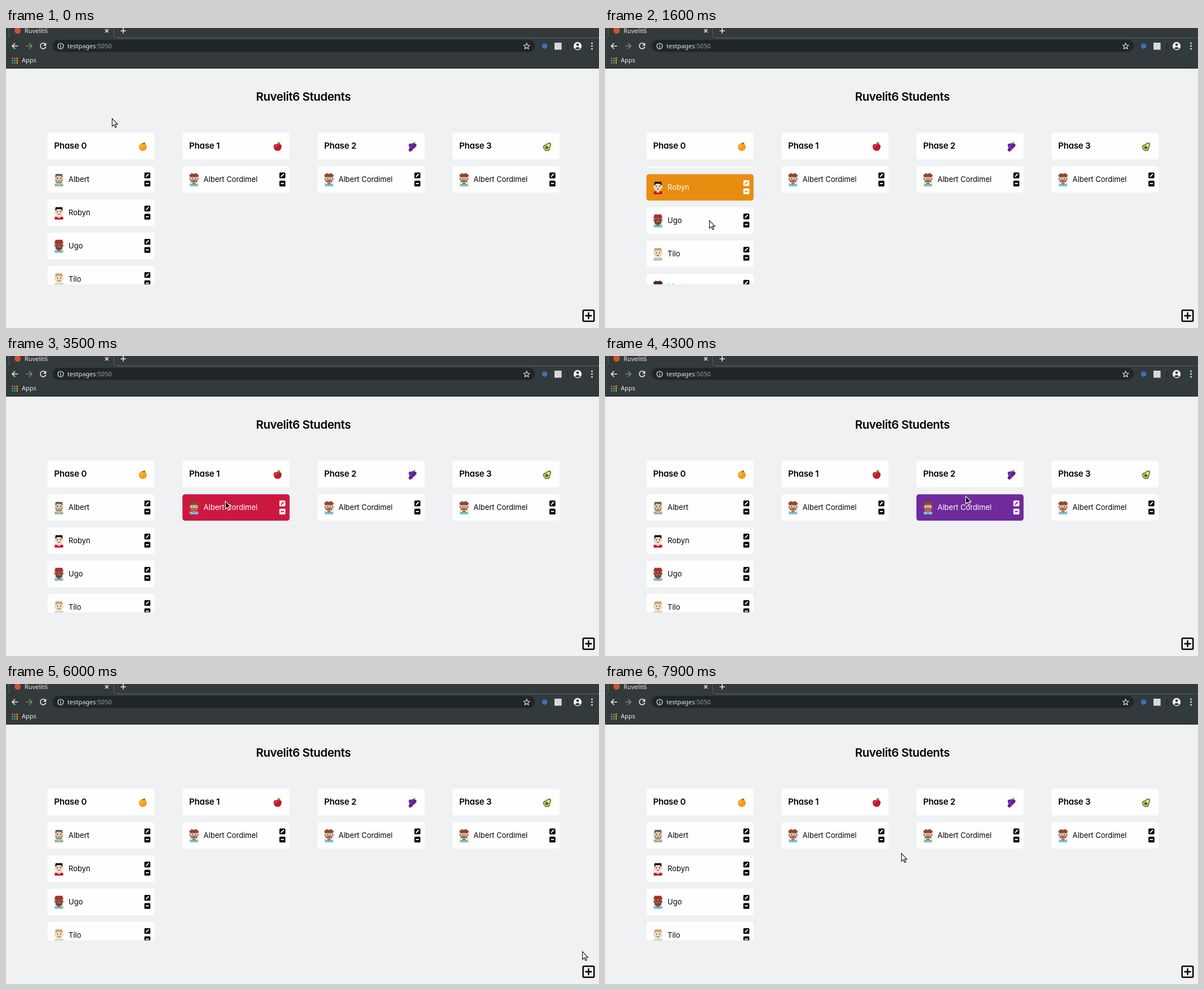
An HTML page for the animation above (8 s loop, 1053 by 532 pixels).

```html
<!DOCTYPE html>
<html lang="en">
<head>
<meta charset="utf-8">
<title>Students board</title>
<style>
  html, body { margin: 0; width: 100%; height: 100%; overflow: hidden; background: #eff1f3; }
  svg { display: block; width: 1053px; height: 532px; }
  text { font: 13px Inter, "Open Sans", sans-serif; font-feature-settings: "cv11"; }
  .head { font-size: 15px; font-weight: 600; letter-spacing: -.2px; }
  .title { font-size: 20.5px; font-weight: 600; letter-spacing: -.4px; }
  .small { font-size: 11px; }
  .mid { text-anchor: middle; }
  .ui text { font: 11px "Noto Sans", "Open Sans", sans-serif; fill: #e8eaea; }
  .line { fill: none; stroke: #e8eaea; stroke-width: 1.6; }
  .field { fill: #fff; stroke: #767676; }
  .card { --bg: #fffefe; --ink: #000; }
  .card.on { --bg: var(--hue); --ink: #fff; }
  .face { fill: var(--bg); }
  .ink { fill: var(--ink); }
  .glyph { stroke: var(--bg); stroke-width: 2; }
</style>
</head>
<body>
<svg id="stage" viewBox="0 0 1053 532"></svg>
<script>
const COLS = [73.5, 313.3, 553, 792.8], HUES = ['#e88d10', '#cc1840', '#702a9c', '#3f7d1c'];
const CARD = { w: 190.3, h: 46.8, top: 245.3, pitch: 58.9 };

const rect = (x, y, w, h, fill, extra = '') =>
  `<rect x="${x}" y="${y}" width="${w}" height="${h}" fill="${fill}" ${extra}/>`;
const dot = (x, y, r, fill) => `<circle cx="${x}" cy="${y}" r="${r}" fill="${fill}"/>`;
const text = (x, y, s, cls = '') => `<text x="${x}" y="${y}" class="${cls}">${s}</text>`;
const path = (d, extra = '') => `<path d="${d}" ${extra}/>`;
const at = (x, y, body, extra = '') => `<g transform="translate(${x} ${y})" ${extra}>${body}</g>`;

// 16 x 16 fruit badges
const leaf = path('M8 4Q9 0 13 1Q12 5 8 4', 'fill="#4c9a2a"');
const grapes = [[4, 6], [8, 5], [12, 6], [5, 9.5], [9.5, 9], [6, 12.5], [4, 14]];
const FRUITS = [
  dot(8.5, 9, 7, '#fb9a14') + dot(6.5, 7, 3, '#ffb63f') + leaf,
  path('M8 5C12 2 15.5 5 15 9C14.5 13 11.5 16.5 8 15.5C4.5 16.5 1.5 13 1 9C.5 5 4 2 8 5', 'fill="#c4182c"')
    + dot(5, 7.5, 1.6, '#ea5a63') + path('M8 5L9 1', 'stroke="#5a3a20" stroke-width="1.3"') + leaf,
  path('M9 5L12 0', 'stroke="#4c8a2a" stroke-width="2"')
    + grapes.map(([x, y], i) => dot(x, y, 2.9, i % 2 ? '#7b2fa8' : '#5e1f8c')).join(''),
  `<g transform="rotate(38 8 8)"><path d="M8 0C12 0 11 5 14 9C16 13 12 16.5 8 16.5S0 13 2 9C5 5 4 0 8 0" fill="#3f7a1e"/>
   <path d="M8 2C11 2 10 6 12 9C14 13 11 15 8 15S2 13 4 9C6 6 5 2 8 2" fill="#dfe58e"/>${dot(8, 10.5, 2.9, '#8a4b22')}</g>`
];

const avatar = ({ hair, skin, shirt, beard, cap, glasses, curly }) =>
  rect(1, 18, 15, 5, shirt) + rect(6, 16, 5, 4, skin) + rect(.5, 8, 16, 4, skin)
  + rect(2.5, 3, 12, 13, skin) + rect(2.5, 1, 12, 3.5, hair) + rect(2, 3, 2, 4, hair) + rect(13, 3, 2, 4, hair)
  + (curly ? rect(.5, 2, 16, 4, hair) + rect(3, 0, 4, 5, hair) + rect(9, 0, 5, 5, hair) : '')
  + (beard ? rect(2.5, 11, 2, 5, beard) + rect(12.5, 11, 2, 5, beard) + rect(4, 15, 9, 2.5, beard) : '')
  + (cap ? rect(2, 0, 13, 5, cap) + rect(.5, 4, 16, 2, cap) : '')
  + (glasses ? rect(3, 7, 5, 4, '#f3eee8') + rect(9, 7, 5, 4, '#f3eee8') : '')
  + rect(5, 8, 1.6, 2, '#2a2222') + rect(10.5, 8, 1.6, 2, '#2a2222') + rect(6.5, 13, 4, 1.2, '#8d3f35');

const LEAD = { hair: '#8c4630', skin: '#b87551', shirt: '#74c3d8', glasses: 1, curly: 1 };
const PEOPLE = [
  ['Albert', { hair: '#62594c', skin: '#e6cda8', shirt: '#8fb89a', beard: '#8d8474' }],
  ['Robyn', { hair: '#0c0a0c', skin: '#f1d9c4', shirt: '#c01432' }],
  ['Ugo', { hair: '#5a2a1c', skin: '#96603f', shirt: '#74bcd4', cap: '#b32930', beard: '#6b3c28' }],
  ['Tilo', { hair: '#c99a62', skin: '#f0d2b2', shirt: '#93cdb4', glasses: 1 }],
  ['Marlo', { hair: '#4a2c1c', skin: '#9a6040', shirt: '#d9b64a', curly: 1 }]
];

const card = (col, row, name, look) => at(COLS[col], CARD.top + row * CARD.pitch,
  `<rect class="face" width="${CARD.w}" height="${CARD.h}" rx="4.5"/>`
  + at(12, 12.5, avatar(look)) + text(37.5, 28.2, name, 'ink')
  + '<rect class="ink" x="172.2" y="10.9" width="10.6" height="10.2" rx="1.5"/>'
  + '<rect class="ink" x="172.2" y="25.4" width="10.6" height="10.2" rx="1.5"/>'
  + path('M175 18.4L180 13.4M174.7 30.5H180.3', 'class="glyph"'),
  `class="card" id="c${col}${row}" style="--hue:${HUES[col]}"`);

const header = (x, i) => at(x, 185.7,
  rect(0, 0, CARD.w, 47.3, '#fffefe', 'rx="4.5"') + text(12, 28.5, 'Phase ' + i, 'head') + at(161, 16.3, FRUITS[i]));

const appColors = ['#e8503c', '#e8503c', '#eaa33a', '#43a860', '#4b8df0', '#eaa33a', '#43a860', '#43a860', '#eaa33a'];
const browser = `<g class="ui">`
  + rect(0, 0, 1053, 72, '#333a3b') + rect(0, 71, 1053, 1, '#24292a')
  + path('M0 17.5H1Q5.5 17.5 5.5 13V0M191.5 0V13Q191.5 17.5 196 17.5H1053', 'fill="none" stroke="#5b6365"')
  + dot(20.5, 4.5, 5.6, '#d2522f') + text(33, 9, 'Ruvelit6')
  + path('M176 2L182 8M182 2L176 8M203.5 5H213M208.2 0V9.5', 'class="line"')
  + path('M21.5 32H11M16 27L11 32L16 37', 'class="line"')
  + path('M36 32H46M41 27L46 32L41 37', 'class="line" style="stroke:#7d8587"')
  + path('M70 28.8A5 5 0 1 0 70.8 33', 'class="line"') + path('M71.3 26V31.5H66Z', 'fill="#e8eaea"')
  + rect(83, 21, 856, 21.5, '#202526', 'rx="10.7"')
  + path('M102 32A5 5 0 1 0 92 32A5 5 0 1 0 102 32M97 31V35M97 28.6V30', 'class="line" style="stroke-width:1.2"')
  + text(109, 35.7, 'testpages<tspan fill="#9aa1a2">:5050</tspan>')
  + path('M924.5 27L926 30.5L929.7 30.8L926.9 33.2L927.8 36.8L924.5 34.9L921.2 36.8L922.1 33.2L919.3 30.8L923 30.5Z',
      'class="line" style="stroke-width:1.1"')
  + dot(956.5, 32, 4.8, '#3d70bd') + rect(974, 26, 12.5, 12.5, '#d8dada') + rect(997, 26, 1, 12, '#171b1c')
  + dot(1015, 32, 7.2, '#f1f3f3') + dot(1015, 29.6, 2.3, '#333a3b')
  + path('M1010.5 36.2Q1015 31.5 1019.5 36.2Q1015 39.5 1010.5 36.2', 'fill="#333a3b"')
  + [27, 32, 37].map(y => dot(1040.5, y, 1.4, '#e8eaea')).join('')
  + appColors.map((c, i) => rect(10.5 + i % 3 * 4, 52.5 + (i / 3 | 0) * 4, 2.6, 2.6, c)).join('')
  + text(28, 61.3, 'Apps') + '</g>';

const dialog = rect(0, 72, 1053, 460, '#dbe3e2', 'fill-opacity=".66"')
  + rect(373.5, 188, 309.5, 232, '#fffefe', 'rx="8"') + text(528, 217, 'Add New Student', 'head mid')
  + rect(373.5, 235.5, 309.5, 1, '#858888')
  + path('M385.5 252H397V254.5H395.5Q395.5 259 391.3 259Q387 259 387 254.5H385.5ZM386 264V262Q386 259.6 388.5 259.6L391.2 262L394 259.6Q396.5 259.6 396.5 262V264Z')
  + text(400, 262.7, 'Name') + rect(386, 276.5, 284.5, 17.5, '', 'class="field" rx="1"')
  + path('M392 310L398 313L392 316L386 313ZM386 315.2L392 318.2L398 315.2V316.6L392 319.4L386 316.6ZM386 318.6L392 321.4L398 318.6V319.6L392 322.6L386 319.6Z')
  + text(401, 320.7, 'Choose a phase:') + rect(386, 332.5, 284.5, 18, '', 'class="field" rx="1"')
  + at(390, 335, `<g transform="scale(.75)">${FRUITS[0]}</g>`) + text(405, 345.2, 'Phase 0', 'small')
  + path('M660 339.5L663.3 342.8L666.6 339.5', 'fill="none" stroke="#000" stroke-width="1.8"')
  + ['Add', 'Cancel'].map((s, i) =>
      rect(386 + i * 142.3, 382, 142.2, 18, '', 'class="field" style="fill:#efefef" rx="1.5"')
      + text(457 + i * 142, 394.7, s, 'small mid')).join('');

const $ = id => document.getElementById(id);
$('stage').innerHTML = '<clipPath id="list"><rect x="73" y="245" width="192" height="209.5"/></clipPath>'
  + rect(0, 0, 1053, 532, '#eff1f3') + text(528, 129, 'Ruvelit6 Students', 'title mid')
  + COLS.map(header).join('')
  + `<g clip-path="url(#list)"><g id="scroll">${PEOPLE.map((p, i) => card(0, i, ...p)).join('')}</g></g>`
  + [1, 2, 3].map(c => card(c, 0, 'Albert Cordimel', LEAD)).join('')
  + rect(1024.7, 500.5, 19.5, 19.5, 'none', 'rx="1.5" stroke="#000" stroke-width="2.5"')
  + path('M1028.5 510.2H1040.5M1034.5 504.2V516.2', 'stroke="#000" stroke-width="2.5"')
  + `<g id="dialog">${dialog}</g>` + browser
  + path('M.5 .5V14.3L3.7 11.4L5.9 16.4L8.1 15.4L5.9 10.6H10.2Z', 'id="cursor" stroke-width="1.1"');

// Pointer moves: first step, last step, destination
const MOVES = [
  [100, 100, 186, 167], [400, 1200, 185, 336], [1300, 1300, 185, 341], [2700, 2700, 189, 322],
  [2800, 2800, 200, 284], [3000, 3100, 250, 298], [3200, 3300, 325, 290], [3400, 3500, 389, 257],
  [3900, 4100, 530, 241], [4200, 4300, 640, 248], [4600, 4600, 646, 245], [4800, 4900, 755, 245],
  [5000, 5100, 888, 251], [5300, 6100, 1040, 502], [6900, 6900, 850, 440], [7200, 7400, 605, 388],
  [7600, 7600, 605, 381], [7800, 7900, 526, 300]
];
// Scrolling: time, offset, row that keeps the highlight meanwhile
const SCROLL = [[0, 0], [1600, 45, 1], [1700, 53, 2], [2000, 80, 2], [2100, 86, 3], [2200, 33, 2], [2500, 0, 1], [2700, 0]];
const clamp = v => Math.max(0, Math.min(1, v));

function pointer(t) {
  let x = 188, y = 160;
  for (const [start, end, toX, toY] of MOVES) {
    const p = clamp((t - start + 100) / (end - start + 100));
    x += (toX - x) * p;
    y += (toY - y) * p;
  }
  return [x, y];
}

function hovered(x, y) {
  const col = COLS.findIndex(c => x >= c && x < c + CARD.w);
  const row = Math.floor((y - CARD.top) / CARD.pitch);
  const inside = y - CARD.top - row * CARD.pitch < CARD.h;
  return col >= 0 && row >= 0 && inside && y < 455 ? `c${col}${row}` : '';
}

function draw(now) {
  const t = Math.floor(now % 8000 / 100) * 100;
  const [x, y] = pointer(t);
  const [, offset, row] = SCROLL.findLast(s => s[0] <= t);
  const target = row === undefined ? hovered(x, y) : 'c0' + row;
  const fade = clamp((t - 6100) / 300) * clamp((7600 - t) / 500);
  const dark = target > 'c1' || fade > 0;
  document.querySelectorAll('.card').forEach(c => c.classList.toggle('on', c.id === target));
  $('scroll').setAttribute('transform', `translate(0 ${-offset})`);
  $('dialog').setAttribute('opacity', fade);
  $('cursor').setAttribute('transform', `translate(${x} ${y})`);
  $('cursor').setAttribute('fill', dark ? '#000' : '#fff');
  $('cursor').setAttribute('stroke', dark ? '#fff' : '#111');
  requestAnimationFrame(draw);
}
requestAnimationFrame(draw);
</script>
</body>
</html>
```
